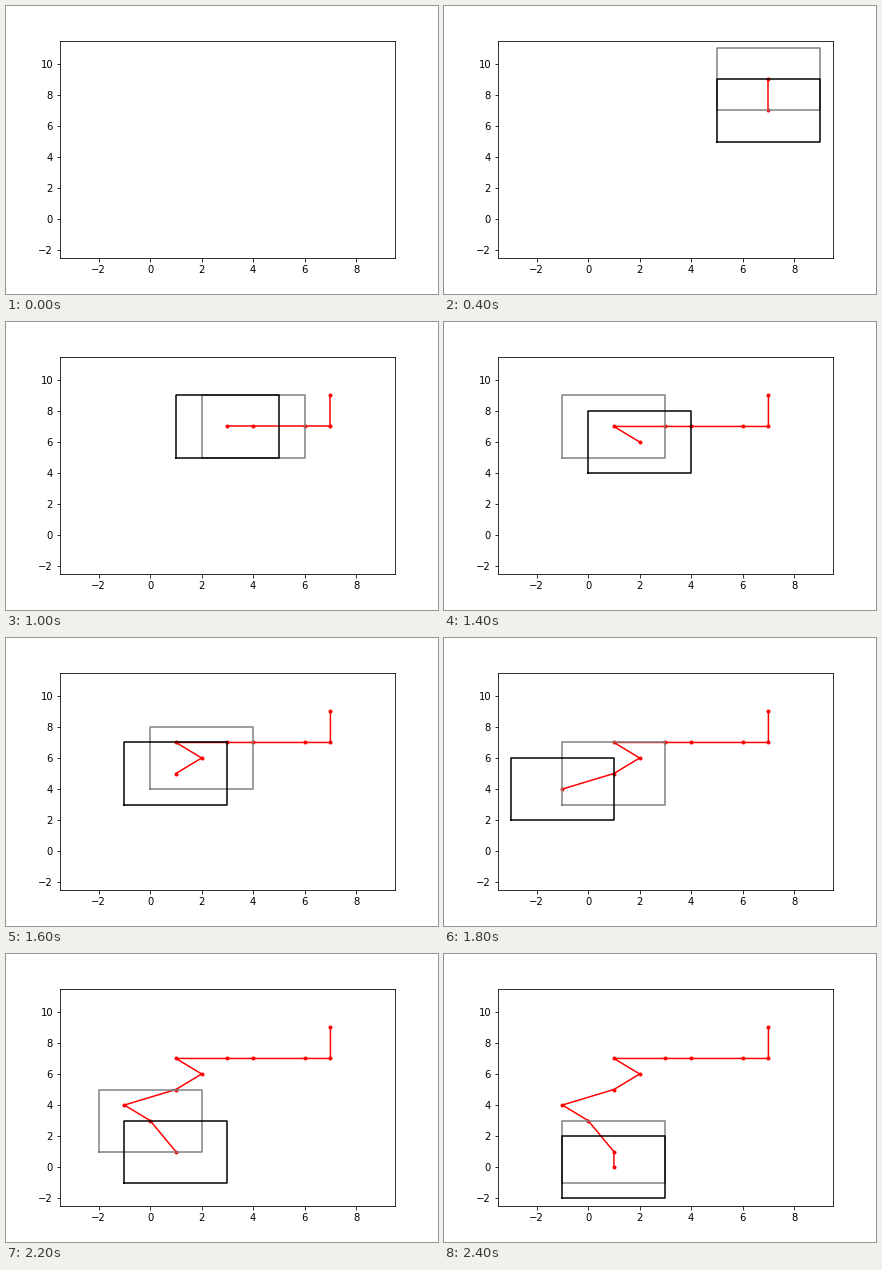
Write a matplotlib script that moves like this. It is 432 px wide and 288 px high and loops after 2600 ms.

```python
import numpy as np
import matplotlib.pyplot as plt
from matplotlib.animation import FuncAnimation

HALF_WIDTH = 2


def make_path():
    """Drop from the start, walk left on a level, then descend in a damped swing."""
    start = [(7, 9)]
    walk = [(np.ceil(7 - 1.5 * k), 7) for k in range(5)]
    descent = [(np.round(0.5 + 1.5 * 0.9**k * np.cos(1.32 * k)),
                np.round(6.2 - 1.2 * k)) for k in range(6)]
    return np.array(start + walk + descent)


def make_square():
    """Closed square around the origin, starting at the lower left corner."""
    angles = np.pi * (1.25 + 0.5 * np.arange(5))
    return HALF_WIDTH * np.sign(np.column_stack([np.cos(angles), np.sin(angles)]))


path = make_path()
square = make_square()

fig, ax = plt.subplots(figsize=(6, 4), dpi=72)
fig.subplots_adjust(bottom=0.125)
ax.set_xlim(-3.5, 9.5)
ax.set_ylim(-2.5, 11.5)

trail, = ax.plot([], [], "r.-")
previous_box, = ax.plot([], [], color="gray")
current_box, = ax.plot([], [], color="black")


def place_box(line, index):
    """Center the square on a path point, or hide it before the path starts."""
    if index < 0:
        line.set_data([], [])
    else:
        line.set_data(*(path[index] + square).T)


def update(frame):
    trail.set_data(*path[:frame].T)
    place_box(previous_box, frame - 2)
    place_box(current_box, frame - 1)
    return trail, previous_box, current_box


anim = FuncAnimation(fig, update, frames=len(path) + 1, interval=200,
                     init_func=lambda: update(0), repeat=True, repeat_delay=0)
plt.show()
```
